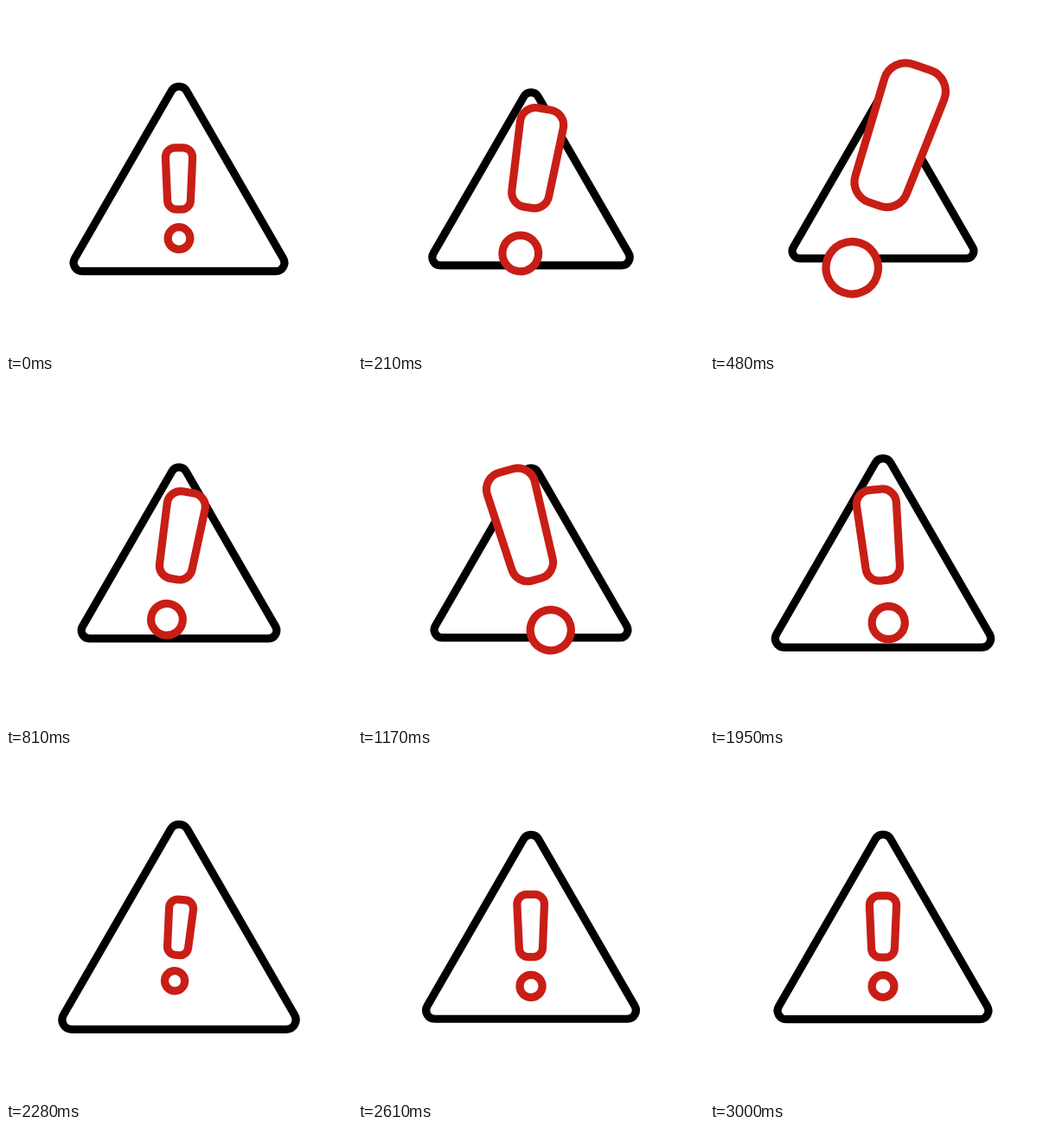
Write an HTML page that moves like this. It is 400 px wide and 400 px high and loops after 3030 ms.

```html
<!DOCTYPE html>
<html lang="en">
<head>
<meta charset="utf-8">
<title>Warning sign</title>
<style>
  html, body { margin: 0; width: 100%; height: 100%; overflow: hidden; background: #fff; }
  svg { display: block; width: 100vw; height: 100vh; }
  path, circle { fill: #fff; stroke-width: 9.2; vector-effect: non-scaling-stroke; }
  .sign { stroke: #000; }
  .mark { stroke: #c81e16; }

  .sign, .drift, .mark {
    transform-origin: 0 0;
    animation: 3030ms cubic-bezier(.333, 0, .667, 1) infinite;
  }
  .sign { animation-name: pulse; }
  .drift { animation-name: drift; }
  .mark { animation-name: lift, swing, grow; }

  @keyframes pulse {
    0%, 99.01%, 100% { scale: 1; }
    14.85% { scale: .86; }
    31.68% { scale: .943; }
    50.83%, 53.47% { scale: .86; }
    72.28% { scale: 1.122; }
    87.79% { scale: .992; }
  }
  @keyframes drift {
    0%, 14.85% { translate: 0 0; }
    26.73% { translate: -3px 0; }
    38.61%, 53.47% { translate: 0 0; }
    75.25% { translate: -1.2px 0; }
    89.11%, 100% { translate: 0 0; }
  }
  @keyframes lift {
    0%, 99.01%, 100% { translate: 0 22.2px; }
    14.85% { translate: 0 0; }
    29.7% { translate: 0 13.2px; }
    49.5%, 53.47% { translate: 0 .3px; }
    72.77% { translate: 0 20.8px; }
  }
  @keyframes swing {
    0%, 99.01%, 100% { rotate: 0deg; }
    14.19% { rotate: 19.3deg; }
    18.81% { rotate: 18.9deg; }
    43.89%, 53.47% { rotate: -20deg; }
    73.6% { rotate: 5.3deg; }
    89.11% { rotate: -.8deg; }
  }
  @keyframes grow {
    0%, 99.01%, 100% { scale: 1; }
    14.85% { scale: 2.36; }
    28.71% { scale: 1.37; }
    49.5%, 53.47% { scale: 2.35; }
    72.77% { scale: .89; }
    88.45% { scale: 1.02; }
  }
</style>
</head>
<body>
<svg viewBox="0 0 400 400">
  <g transform="translate(200 200)">
    <path class="sign" d="M-8.66-102A10 10 0 0 1 8.66-102L120.5 91.7A10 10 0 0 1 111.9 106.7H-111.9A10 10 0 0 1-120.5 91.7Z"/>
    <g class="drift">
      <g class="mark">
        <path d="M-4.6-58.4H4.6A11 11 0 0 1 15.6-46.9L13.4 2.8A10.5 10.5 0 0 1 2.9 13H-2.9A10.5 10.5 0 0 1-13.4 2.8L-15.6-46.9A11 11 0 0 1-4.6-58.4Z"/>
        <circle cy="46.3" r="12.9"/>
      </g>
    </g>
  </g>
</svg>
</body>
</html>
```
